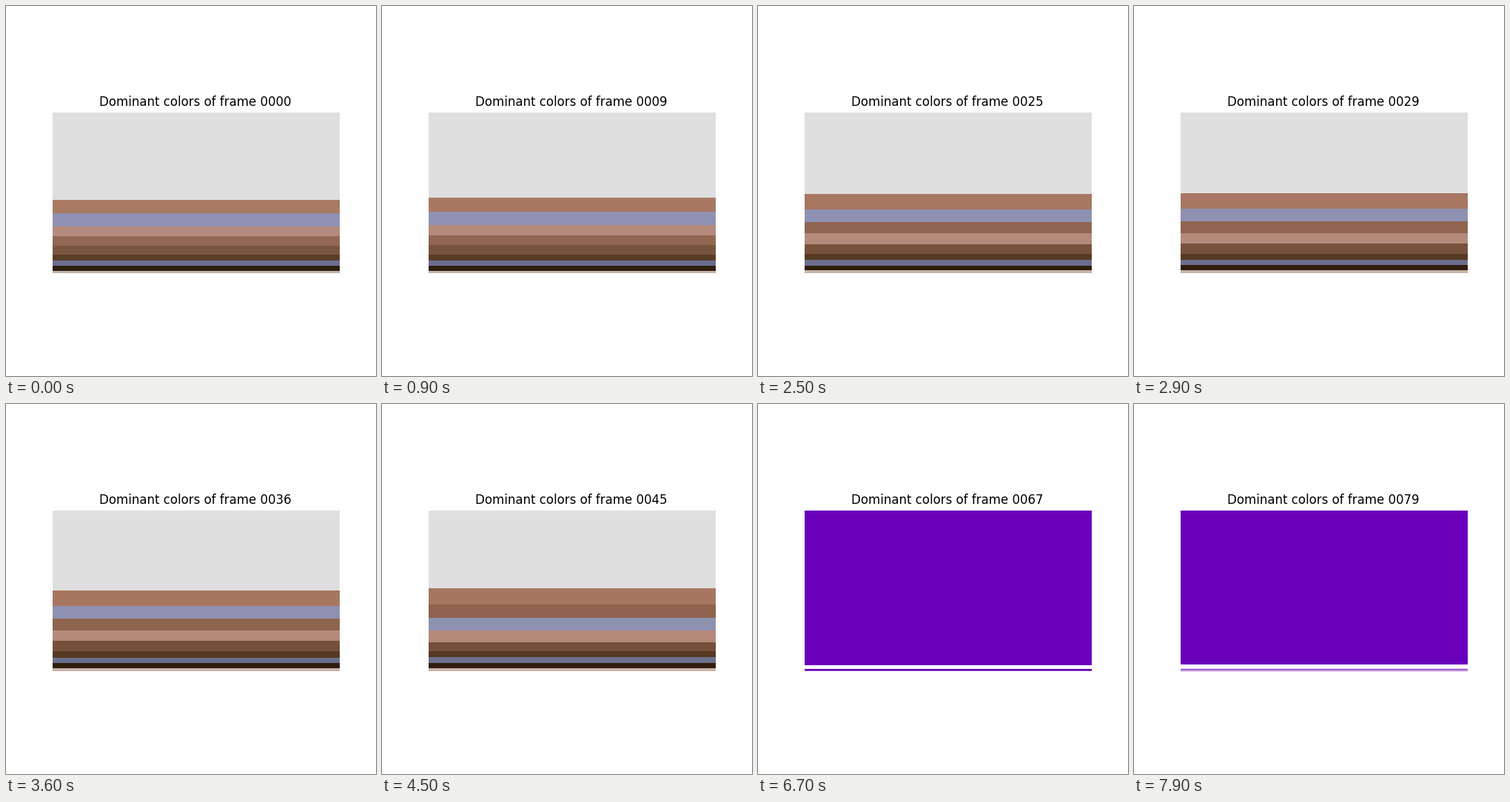
Recreate the animation shown at these times as a matplotlib script. Size 500 by 500 pixels, loop 8000 ms.

```python
import numpy as np
import matplotlib.pyplot as plt
from matplotlib.animation import FuncAnimation
from matplotlib.colors import to_rgb

FRAMES, STEP = 80, 100
LEFT, BOTTOM, WIDTH, HEIGHT = 63, 139, 388, 217
CUT = 50  # first frame of the purple scene

# Warm scene: colour at start, colour at end, band height at each key
KEYS = [0, 17, 25, 36, 45]
WARM = [
    ("#dfdfdf", "#dfdfdf", [118, 112, 110, 108, 105]),
    ("#a97963", "#a67660", [18, 21, 21, 21, 22]),
    ("#9091b3", "#8e91b0", [17.6, 17, 17, 17, 17]),
    ("#b48b7d", "#b58a7b", [13.4, 14.8, 14.6, 14.2, 16]),
    ("#936853", "#8f634e", [13, 14.2, 15.2, 15.8, 18]),
    ("#7b563f", "#754f39", [12, 13, 13, 14, 12]),
    ("#5a3d26", "#553922", [8, 8, 8.2, 8.8, 8.2]),
    ("#6b6e91", "#6c6f8e", [7.2, 7.2, 7.6, 7.2, 7.8]),
    ("#2f1f10", "#301d0c", [6.8, 6.8, 6.4, 7, 7]),
    ("#bfb3a5", "#c9b3aa", [3, 3, 4, 4, 4]),
]

# Purple scene: colour, height at start, height at end
PURPLE_KEYS = [55, 79]
PURPLE = [
    ("#6a00bc", 210, 208),
    ("#ffffff", 5, 6),
    ("#6400ae", 1, 1),
    ("#ecdcf6", 0, 1),
    ("#9a48cc", 1, 1),
]


def mix(a, b, t):
    return (1 - t) * np.array(to_rgb(a)) + t * np.array(to_rgb(b))


def warm_bands(i):
    t = min(i / KEYS[-1], 1)
    bands = [(np.interp(i, KEYS, h), mix(a, b, t)) for a, b, h in WARM]
    return sorted(bands, key=lambda band: -band[0])


def purple_bands(i):
    return [(np.interp(i, PURPLE_KEYS, (h0, h1)), to_rgb(c))
            for c, h0, h1 in PURPLE]


def stack(bands):
    heights = np.array([h for h, _ in bands])
    edges = np.rint(np.cumsum(heights) / heights.sum() * HEIGHT).astype(int)
    img = np.ones((HEIGHT, WIDTH, 3))
    top = 0
    for end, (_, color) in zip(edges, bands):
        img[top:end] = color
        top = end
    return img


fig = plt.figure(figsize=(5, 5), dpi=100, facecolor="white")
chart = fig.figimage(np.ones((HEIGHT, WIDTH, 3)), xo=LEFT, yo=BOTTOM,
                     origin="upper")
title = fig.text(256.25 / 500, 364.8 / 500, "", fontsize=12,
                 family="DejaVu Sans", ha="center", va="baseline",
                 color="black")


def update(i):
    chart.set_data(stack(warm_bands(i) if i < CUT else purple_bands(i)))
    title.set_text(f"Dominant colors of frame {i:04d}")
    return chart, title


anim = FuncAnimation(fig, update, frames=FRAMES, interval=STEP,
                     repeat=True, repeat_delay=0, blit=False)
plt.show()
```
